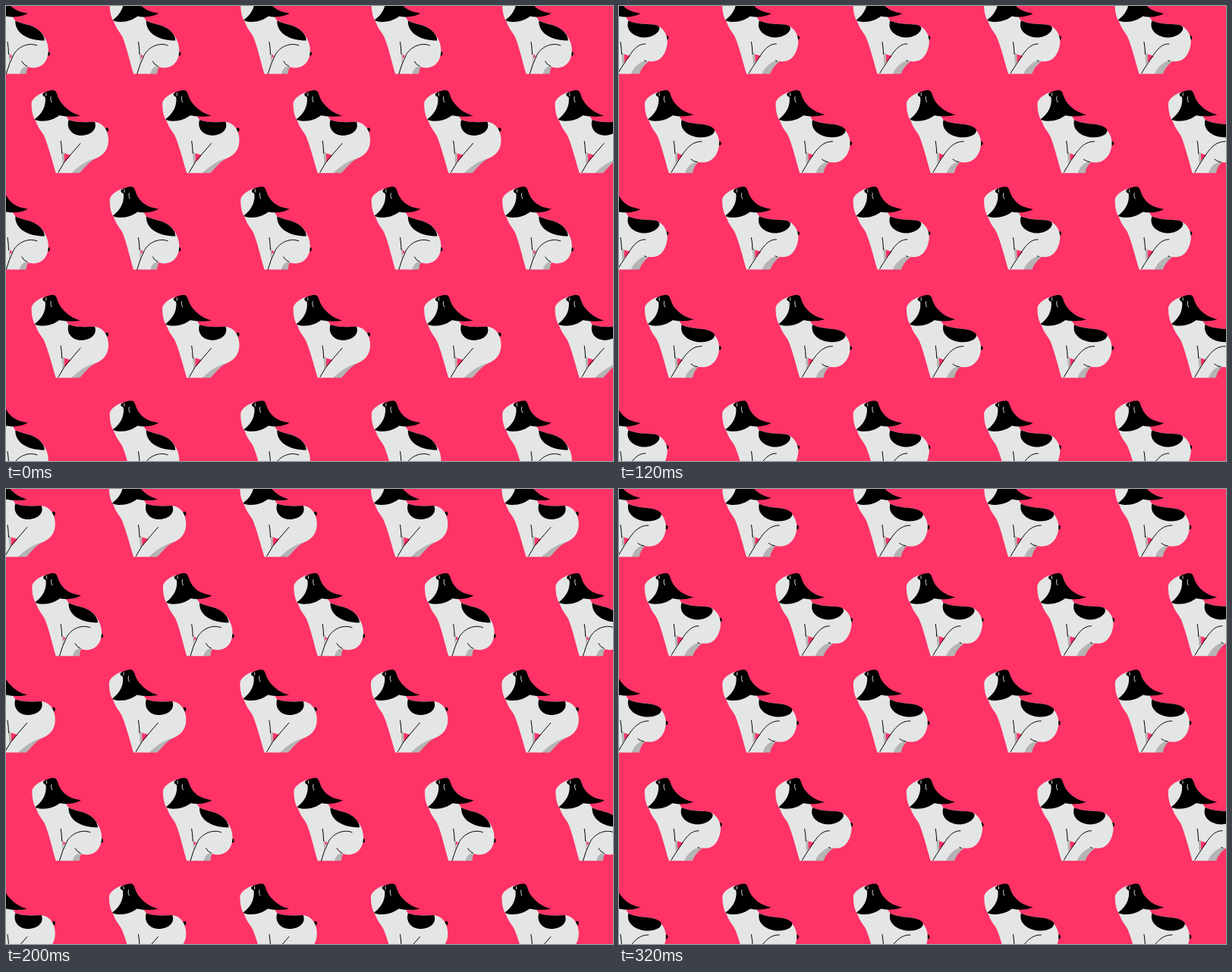
Recreate the animation shown at these times as an HTML page. Size 800 px wide and 600 px high, loop 360 ms.

```html
<!DOCTYPE html>
<html lang="en">
<head>
<meta charset="utf-8">
<title>Dog pattern</title>
<style>
  html, body { margin: 0; width: 100%; height: 100%; overflow: hidden; background: #ff3366; }
  svg { display: block; width: 800px; height: 600px; }
  .scene { visibility: hidden; }
  .coat { fill: #e4e6e6; }
  .shade { fill: #b4b4b4; }
  .gap { fill: #ff3366; }
  .line { fill: none; stroke: #000; stroke-width: 1; stroke-linecap: round; }
  .glint { fill: none; stroke: #e4e6e6; stroke-width: .9; }
</style>
</head>
<body>
<svg id="stage" viewBox="0 0 800 600"></svg>
<script>
const STEP = 40, STEPS = 9;

// Hindquarters, from standing to sitting; lean moves the head and neck sideways.
const poses = [
  {
    lean: -.8,
    rump: 'C95 154 107 153 117 152.5C129 154 135 165 135 177C135 190 127 198 117 201C108 203 97 210 86 220',
    shade: 'M85 220H97C105 212 110 204 120 200L100 203z',
    spot: 'M82.5 150C79 162 88 170.5 99 170.5S121 164 117 152.5C107 153 95 154 82.5 150z',
    lines: 'M98 181L85 196Q76 205 69 219',
    gap: [77, 8.5, 206], tail: [133, 163]
  },
  {
    lean: -.6,
    rump: 'C95 155 106 154 116 155C128 157 134 168 134 178C133 192 126 203 115 203.5Q111 204 105 202.5C98 204 90 211 86 220',
    shade: 'M85 220H97Q100 211 110 203L100 200z',
    spot: 'M82.5 150C78 164 92 172 104 172S126 163 123 158Q121 155.5 116 155C106 154 95 155 82.5 150z',
    lines: 'M105 180.5C92 180 85 195 78 205Q73 212 69 219M104 202.3L106 203.2',
    gap: [77, 8, 205], tail: [133.5, 172.5]
  },
  {
    lean: -.4,
    rump: 'C93 155 104 155 112 156C125 158 132 170 132 180C132 196 122 206 111 206Q106 206.5 103 205C96 206 90 211 87 220',
    shade: 'M85 220H97Q98 212 105 205L95 203z',
    spot: 'M82.5 150C79 165 95 173 108 173S128 167 125.5 162Q121 157.5 112 156C104 155 93 155 82.5 150z',
    lines: 'M109 178.5C93 178 85 194 78 204Q73 212 69 219M95 202Q98 205 103 205.5',
    gap: [77, 7, 204], tail: [132.5, 181]
  },
  {
    lean: 0,
    rump: 'C92 155 103 154 113 162C122 170 126 180 126 189C126 203 118 212 106 212Q101 212 98 210C93 210 90 213 88 220',
    shade: 'M85 220H97Q97 214 100 210L92 207z',
    spot: 'M82.5 150C82 166 98 176 121 176Q121 169 113 162C103 154 92 155 82.5 150z',
    lines: 'M111 182.5C100 178 86 184 80 195Q74 207 70.5 220M91 203.5Q93 208 98 210',
    gap: [75.5, 3, 200], tail: [126, 193.5]
  }
];

// Pose and height of the ear tip at each step, for the two kinds of row.
const tracks = [
  { x: 0, rows: [.2, 270.2],
    pose: [0, 0, 1, 2, 3, 3, 3, 2, 1],
    ear: [144.5, 146, 146, 143, 140.5, 140.3, 140, 140, 142.5] },
  { x: -70.2, rows: [-130.5, 127.4, 409.5],
    pose: [3, 3, 2, 1, 1, 0, 1, 1, 2],
    ear: [140.3, 140, 140, 140.5, 142.3, 144, 145.5, 146.2, 142.3] }
];

const path = (d, kind = '') => `<path class="${kind}" d="${d}"/>`;

function head(earY, lean) {
  return `<g transform="translate(${lean})">` +
    path('M34.5 127C36 121 44 116 51 113.5L60 130L39 150C36 145 34 136 34.5 127z', 'coat') +
    path(`M49 115.5C54 112 60 110.5 64 111C69 112 67 120 75 129C82 137 90 ${earY - 2} 99 ${earY}` +
      'Q86 147 71 144C66 148 58 151.5 48 151.5Q41 151 38.5 149C48 142 54 132 52.5 120L49.5 118z') +
    path('M53.6 114V118.5M60 119Q58.7 123 61 127', 'glint') + '</g>';
}

function dog({ lean, rump, shade, spot, lines, gap: [x, width, bottom], tail: [tx, ty] }, earY) {
  return `<ellipse cx="${tx}" cy="${ty}" rx="2.1" ry="2.7"/>` +
    path(shade, 'shade') +
    path(`M${39 + lean} 148L60 138L78 143L82.5 150${rump}H65.7` +
      `C60 201 ${57 + lean} 185 ${51 + lean} 171C${48 + lean} 165 ${42 + lean} 160 ${39 + lean} 148z`, 'coat') +
    path(`M73.5 191L${x} 194V${bottom}L74.5 208z`, 'shade') +
    path(`M${x} 194l${width} 2.5L${x} ${bottom}z`, 'gap') +
    path(spot) +
    path(`M72.2 178Q73.5 185 73.7 194${lines}`, 'line') +
    head(earY, lean);
}

function scene(step) {
  return tracks.map((track, t) => {
    const id = `dog-${t}-${step}`;
    const copies = track.rows.flatMap(y => Array.from({ length: 5 }, (_, i) =>
      `<use href="#${id}" x="${track.x + 172.5 * i}" y="${y}"/>`));
    return `<defs><g id="${id}">${dog(poses[track.pose[step]], track.ear[step])}</g></defs>` + copies.join('');
  }).join('');
}

const stage = document.getElementById('stage');
stage.innerHTML = Array.from({ length: STEPS }, (_, i) => `<g class="scene">${scene(i)}</g>`).join('');

const edge = i => Math.min(1, Math.max(0, i / STEPS - 1e-6 * (i < STEPS)));
const key = (visibility, offset) => ({ visibility, offset, easing: 'step-end' });
stage.querySelectorAll('.scene').forEach((group, i) => {
  const last = i === STEPS - 1;
  const frames = [
    ...(i ? [key('hidden', 0)] : []),
    key('visible', edge(i)),
    ...(last ? [key('visible', 1)] : [key('hidden', edge(i + 1)), key('hidden', 1)])
  ];
  const player = group.animate(frames, { duration: STEP * STEPS, iterations: Infinity });
  player.startTime = document.timeline.currentTime;
});
</script>
</body>
</html>
```
